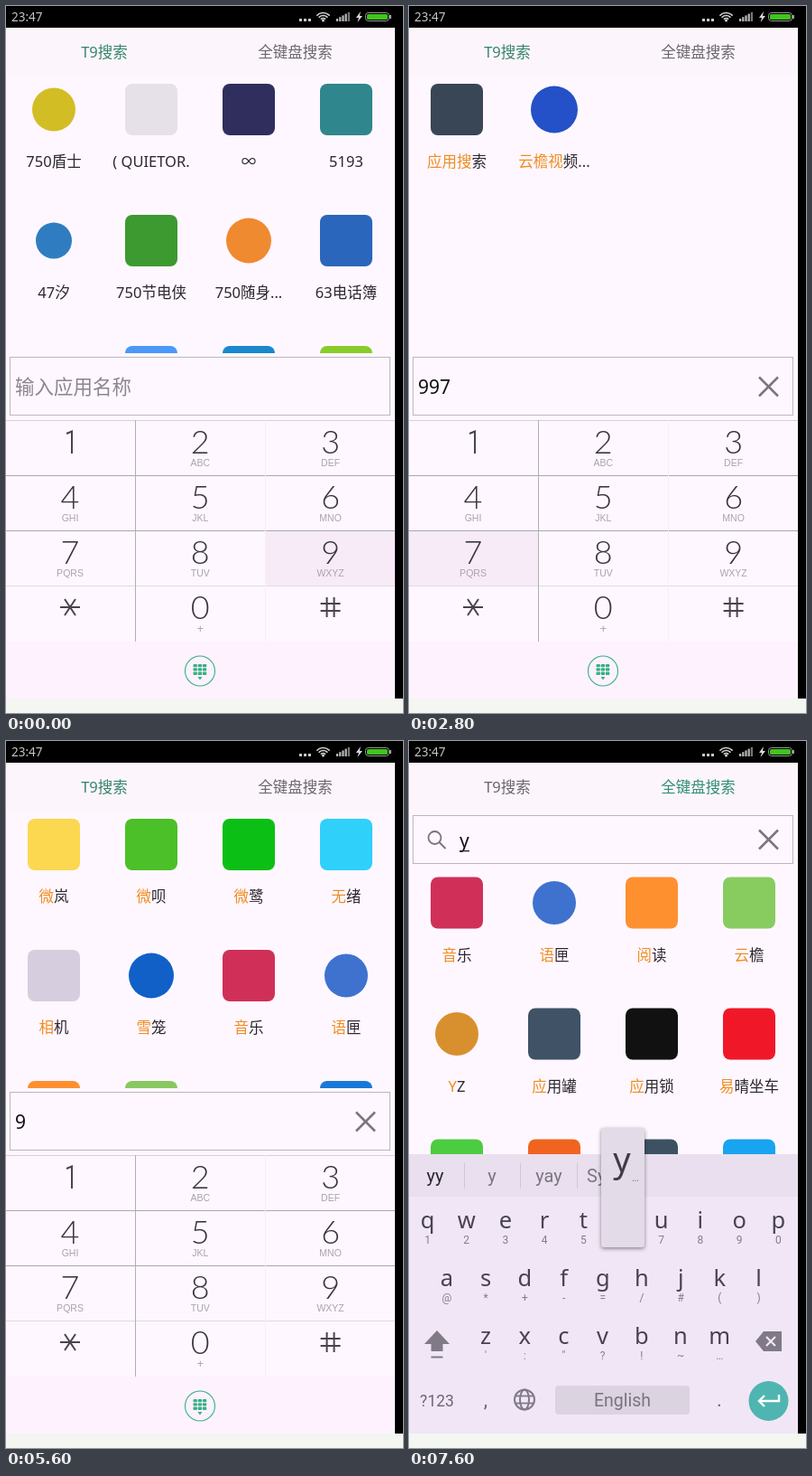
Recreate the animation shown at these times as an HTML page with a canvas. Size 440 by 782 pixels, loop 8 s.

```html
<!DOCTYPE html>
<html lang="zh">
<head>
<meta charset="utf-8">
<title>T9搜索</title>
<style>
html, body { margin: 0; width: 100%; height: 100%; overflow: hidden; background: #f3f6f1; }
canvas { display: block; width: 440px; height: 782px; }
</style>
</head>
<body>
<canvas id="stage"></canvas>
<script>
const W = 440, H = 782, LOOP = 8000;
const canvas = document.getElementById('stage');
const ctx = canvas.getContext('2d');
const dpr = window.devicePixelRatio || 1;
canvas.width = W * dpr;
canvas.height = H * dpr;

const SANS = '"Noto Sans", "Noto Sans CJK SC", "Noto Sans CJK", sans-serif';
const ROBOTO = 'Roboto, sans-serif';
const ORANGE = '#f08c22', INK = '#2b272d', BG = '#fef7ff';

// label, icon colour, highlighted letters, circle radius (0 = rounded square)
const app = (name, color, hit = 0, round = 0) => ({ name, color, hit, round });
const edge = (...colors) => colors.map(c => app('', c));

const LISTS = {
  all: [
    app('750盾士', '#d3bd25', 0, 24), app('( QUIETOR.', '#e6e1e8'),
    app('∞', '#302e5c'), app('5193', '#2f868c'),
    app('47汐', '#2f7dc0', 0, 20), app('750节电侠', '#3c9a30'),
    app('750随身...', '#f08a30', 0, 25), app('63电话簿', '#2a66bb'),
    ...edge(BG, '#4a98f8', '#1a88cc', '#88cc28')
  ],
  9: [
    app('微岚', '#fbd850', 1), app('微呗', '#4cc028', 1),
    app('微鹭', '#0bbf14', 1), app('无绪', '#2fd0fa', 1),
    app('相机', '#d6cede', 1), app('雪笼', '#1060c8', 1, 25),
    app('音乐', '#d03058', 1), app('语匣', '#3f72cf', 1, 24),
    ...edge('#fe9030', '#88c860', BG, '#1a78d8')
  ],
  99: [
    app('微鹭', '#0bbf14', 2), app('音乐', '#d03058', 2),
    app('云檐', '#88cc60', 2), app('YZ', '#d8902f', 2, 24),
    app('专栖', '#d9c9d4', 2, 25), app('我瞄瞄', '#70b0d0', 2),
    app('应用罐', '#3f5266', 2), app('应用锁', '#111111', 2),
    ...edge('#980008', '#e81e44', '#d81018', '#68b030')
  ],
  997: [app('应用搜索', '#384656', 3), app('云檐视频...', '#2450c8', 3, 26)],
  9977: [app('应用搜索', '#384656', 4), app('云檐视频...', '#2450c8', 4, 26)],
  y: [
    app('音乐', '#d03058', 1), app('语匣', '#3f72cf', 1, 24),
    app('阅读', '#fe9030', 1), app('云檐', '#88cc60', 1),
    app('YZ', '#d8902f', 1, 24), app('应用罐', '#3f5266', 1),
    app('应用锁', '#111111', 1), app('易晴坐车', '#f01828', 1),
    ...edge('#4ccc40', '#f06420', '#3c5262', '#18a4f0')
  ]
};

// start time, query, pressed control
const STEPS = [
  [0, '', '9'], [400, '9', ''], [1200, '9', '9'], [1600, '99', ''],
  [2000, '99', '7'], [2400, '997', ''], [2800, '997', '7'], [3200, '9977', ''],
  [3600, '9977', 'x'], [4000, '997', ''], [4400, '997', 'x'], [4800, '99', ''],
  [5200, '99', 'x'], [5600, '9', ''], [6400, '9', 'x'], [6800, '', ''],
  [7200, '', 'full'], [7600, 'y', 'full']
];

function text(str, x, y, size, color, align = 'center', font = SANS, weight = 400) {
  ctx.font = `${weight} ${size}px ${font}`;
  ctx.textAlign = align;
  ctx.fillStyle = color;
  ctx.fillText(str, x, y);
}

function rect(x, y, w, h, color) {
  ctx.fillStyle = color;
  ctx.fillRect(x, y, w, h);
}

function roundRect(x, y, w, h, r, color) {
  ctx.beginPath();
  ctx.roundRect(x, y, w, h, r);
  ctx.fillStyle = color;
  ctx.fill();
}

function disc(x, y, r, color) {
  ctx.beginPath();
  ctx.arc(x, y, r, 0, Math.PI * 2);
  ctx.fillStyle = color;
  ctx.fill();
}

function ring(x, y, r, color, width) {
  ctx.beginPath();
  ctx.arc(x, y, r, 0, Math.PI * 2);
  ctx.strokeStyle = color;
  ctx.lineWidth = width;
  ctx.stroke();
}

function line(color, width, ...pts) {
  ctx.beginPath();
  for (let i = 0; i < pts.length; i += 2) ctx.lineTo(pts[i], pts[i + 1]);
  ctx.strokeStyle = color;
  ctx.lineWidth = width;
  ctx.stroke();
}

function shape(color, ...pts) {
  ctx.beginPath();
  for (let i = 0; i < pts.length; i += 2) ctx.lineTo(pts[i], pts[i + 1]);
  ctx.fillStyle = color;
  ctx.fill();
}

function statusBar() {
  rect(0, 0, W, 24, '#000');
  text('23:47', 6, 17, 13.5, '#c4c4c4', 'left', SANS, 500);
  for (let i = 0; i < 3; i++) rect(325 + i * 5, 14, 3, 3, '#c8c8c8');
  for (const r of [3.5, 6.5, 9.5]) {
    ctx.beginPath();
    ctx.arc(351.5, 17, r, -Math.PI * 0.77, -Math.PI * 0.23);
    ctx.strokeStyle = '#d0d0d0';
    ctx.lineWidth = 1.7;
    ctx.stroke();
  }
  disc(351.5, 16, 1.5, '#d0d0d0');
  for (let i = 0; i < 5; i++) {
    const h = 3 + i * 1.8;
    rect(366 + i * 3.2, 17 - h, 2.2, h, i < 4 ? '#b8b8b8' : '#777');
  }
  shape('#d8d8d8', 393, 6, 388, 13, 391, 13, 389.5, 18, 395, 11, 392, 11);
  ctx.beginPath();
  ctx.roundRect(398.5, 7.5, 26, 9, 3);
  ctx.strokeStyle = '#9a9a9a';
  ctx.lineWidth = 1;
  ctx.stroke();
  roundRect(400, 9, 23, 6, 1.5, '#3fc51c');
  rect(425, 10, 2, 4, '#9a9a9a');
}

function tabs(full) {
  rect(0, 24, 431, 53, '#fcf5fc');
  text('T9搜索', 109, 57, 16.5, full ? '#6b666e' : '#35866a');
  text('全键盘搜索', 320.5, 57, 16.5, full ? '#2f9070' : '#6b666e');
}

function label(a, x, y) {
  const size = 16.5;
  ctx.font = `400 ${size}px ${SANS}`;
  const head = a.name.slice(0, a.hit), tail = a.name.slice(a.hit);
  const left = x - ctx.measureText(a.name).width / 2;
  const split = left + ctx.measureText(head).width;
  text(head, left, y, size, ORANGE, 'left');
  text(tail, split, y, size, INK, 'left');
}

function appGrid(list, top, bottom) {
  ctx.save();
  ctx.beginPath();
  ctx.rect(0, 77, 431, bottom - 77);
  ctx.clip();
  list.forEach((a, i) => {
    const x = 53 + (i % 4) * 108, y = top + Math.floor(i / 4) * 145;
    if (a.round) disc(x, y + 28.5, a.round, a.color);
    else roundRect(x - 29, y, 58, 57, 8, a.color);
    label(a, x, y + 92);
  });
  ctx.restore();
}

function box(y, h) {
  rect(4, y, 422, h, BG);
  ctx.strokeStyle = '#bdb5c0';
  ctx.lineWidth = 1;
  ctx.strokeRect(4.5, y + 0.5, 421, h - 1);
}

function clearMark(y, dark) {
  const c = dark ? '#454047' : '#7a747c';
  line(c, 2.5, 388, y - 10.5, 409, y + 10.5);
  line(c, 2.5, 409, y - 10.5, 388, y + 10.5);
}

function dialPad(pressed) {
  const keys = '123456789*0#';
  const subs = ['', 'ABC', 'DEF', 'GHI', 'JKL', 'MNO', 'PQRS', 'TUV', 'WXYZ', '', '+', ''];
  const ink = '#49434c';
  rect(0, 458, 431, 245, BG);
  [...keys].forEach((k, i) => {
    const col = i % 3, row = Math.floor(i / 3);
    const x = 71 + col * 144.3, y = 483 + row * 61;
    if (k === pressed) rect(col * 144, 458 + row * 61, 143, 61, '#f7ebf8');
    if (k === '1') {
      line(ink, 2, 67, 473, 73, 470.5, 73, 495);
    } else if (k === '*') {
      line(ink, 2, x - 11, y - 1, x + 11, y - 1);
      line(ink, 2, x - 6, y - 10, x + 6, y + 8);
      line(ink, 2, x + 6, y - 10, x - 6, y + 8);
    } else if (k === '#') {
      for (const d of [-4, 4]) {
        line(ink, 2, x - 11, y - 1 + d, x + 11, y - 1 + d);
        line(ink, 2, x + d, y - 12, x + d, y + 10);
      }
    } else {
      text(k, x, y + 12, 36, '#39333c', 'center', 'Lato, sans-serif', 300);
    }
    text(subs[i], x, y + (k === '0' ? 27 : 26), k === '0' ? 13 : 10.5, '#aaa2ad',
      'center', '"Liberation Sans", sans-serif');
  });
  rect(0, 458, 431, 1, '#d6cfd8');
  rect(0, 519, 431, 1, '#aca4b0');
  rect(0, 580, 431, 1, '#aca4b0');
  rect(0, 641, 431, 1, '#e3dae4');
  rect(143, 458, 1, 245, '#a9b5aa');
  rect(287, 458, 1, 245, '#f6eef6');
}

function padToggle() {
  const g = '#35b183';
  rect(0, 703, 431, 63, '#fdf2fd');
  ring(215, 735.5, 16.5, g, 1.1);
  for (let i = 0; i < 9; i++)
    roundRect(207.5 + (i % 3) * 5.2, 728 + Math.floor(i / 3) * 4.3, 4.4, 3.3, 1, g);
  shape(g, 212.5, 742, 217.5, 742, 215, 745.5);
}

function keyRow(keys, hints, x0, y) {
  [...keys].forEach((k, i) => {
    const x = x0 + i * 43.2;
    text(k, x, y, 25.5, '#48434f', 'center', SANS);
    text(hints[i], x, y + 17, 12, '#837d88', 'center', ROBOTO);
  });
}

function keyboard(typed) {
  rect(0, 457, 431, 309, '#f1e6f6');
  rect(0, 457, 431, 47, '#e9dfee');
  if (typed) {
    text('yy', 29, 488, 20, '#2a272c', 'center', ROBOTO);
    text('y', 92, 488, 20, '#7b757f', 'center', ROBOTO);
    text('yay', 155, 488, 20, '#7b757f', 'center', ROBOTO);
    text('Sy', 197, 488, 20, '#7b757f', 'left', ROBOTO);
    for (const x of [61, 123, 186]) rect(x, 467, 1, 28, '#d0c7d4');
  }
  keyRow('qwertyuiop', '1234567890', 20.5, 539);
  keyRow('asdfghjkl', '@*+-=/#()', 42, 603);
  keyRow('zxcvbnm', '\':"?!~…', 85, 667);

  const grey = '#807a86';
  shape(grey, 31, 652, 45, 667, 37.5, 667, 37.5, 675, 24.5, 675, 24.5, 667, 17, 667);
  rect(24.5, 680.5, 13, 2, grey);
  shape(grey, 384, 664, 393, 653, 413, 653, 413, 675, 393, 675);
  line('#f1e6f6', 2.2, 396, 659, 406, 669);
  line('#f1e6f6', 2.2, 406, 659, 396, 669);

  text('?123', 31, 736, 17.5, '#6d6773', 'center', ROBOTO);
  text(',', 85, 736, 22, '#6d6773', 'center', ROBOTO);
  ring(128, 728.5, 11, grey, 2);
  ctx.beginPath();
  ctx.ellipse(128, 728.5, 5, 11, 0, 0, Math.PI * 2);
  ctx.stroke();
  line(grey, 1.8, 118, 724.5, 138, 724.5);
  line(grey, 1.8, 118, 732.5, 138, 732.5);
  roundRect(162, 713, 149, 32, 4, '#dbd3df');
  text('English', 236.5, 736, 19.5, '#7a747e', 'center', ROBOTO);
  text('.', 344, 736, 22, '#6d6773', 'center', ROBOTO);
  disc(398.5, 730, 22, '#4fb5b0');
  line('#fff', 2.4, 410, 723, 410, 730, 388, 730);
  line('#fff', 2.4, 394, 724, 388, 730, 394, 736);

  if (typed) {
    ctx.save();
    ctx.shadowColor = 'rgba(0,0,0,.45)';
    ctx.shadowBlur = 4 * dpr;
    ctx.shadowOffsetY = 1.5 * dpr;
    roundRect(213, 428, 48, 132, 3, '#e3dbe8');
    ctx.restore();
    text('y', 236, 477, 38, '#403b45');
    text('…', 251, 487, 12, '#857f8a', 'center', ROBOTO);
  }
}

function dialScreen(query, pressed) {
  appGrid(LISTS[query || 'all'], 86, 384);
  box(388, 65);
  if (query) {
    text(query, 10, 429, 21, '#111', 'left', SANS, 500);
    clearMark(421, pressed === 'x');
  } else {
    text('输入应用名称', 10, 429, 21.5, '#8b858e', 'left');
  }
  dialPad(pressed);
  padToggle();
}

function fullScreen(query) {
  appGrid(LISTS[query || 'all'], 150.5, 457);
  box(82, 54);
  ring(28.5, 107, 7, '#7a747c', 1.8);
  line('#7a747c', 2, 33.5, 112, 40.5, 119);
  if (query) {
    text(query, 56, 118, 21, '#111', 'left', SANS, 500);
    rect(56, 121, 11, 1.3, '#222');
    clearMark(109, false);
  } else {
    text('输入应用名称', 56, 117, 21.5, '#8b858e', 'left');
  }
  keyboard(query !== '');
}

function frame() {
  const t = performance.now() % LOOP;
  const [, query, mode] = STEPS.findLast(s => s[0] <= t);
  const full = mode === 'full';
  ctx.setTransform(dpr, 0, 0, dpr, 0, 0);
  rect(0, 0, W, H, '#f3f6f1');
  rect(0, 24, 431, 742, BG);
  tabs(full);
  if (full) fullScreen(query);
  else dialScreen(query, mode);
  rect(431, 24, 9, 742, '#000');
  statusBar();
  requestAnimationFrame(frame);
}
frame();
</script>
</body>
</html>
```
